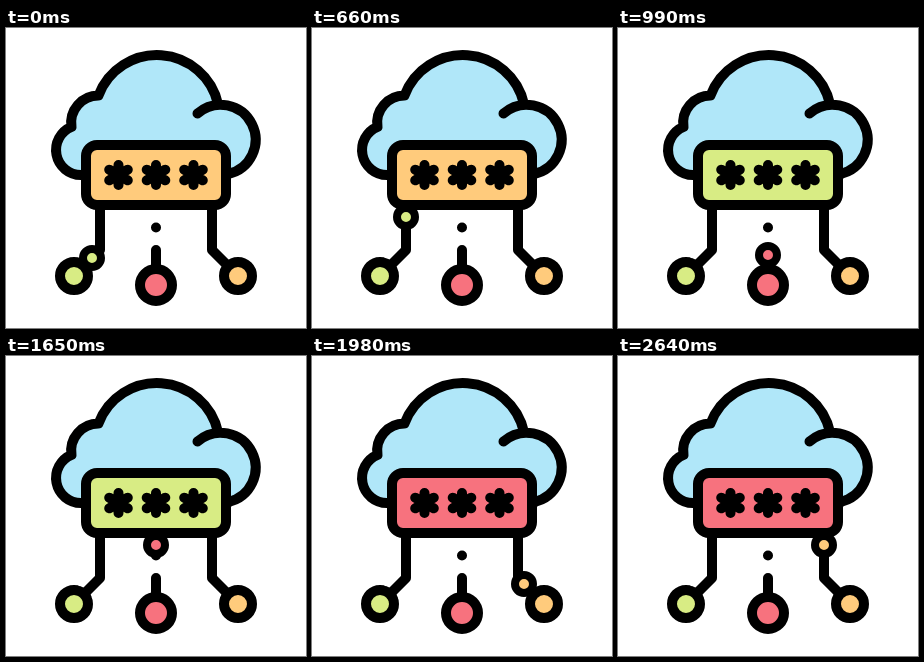
These frames come from a looping animation (300 by 300 pixels, 2970 ms). An HTML page:

```html
<!DOCTYPE html>
<html lang="en">
<head>
<meta charset="utf-8">
<title>Cloud password</title>
<style>
  html, body { margin: 0; height: 100%; overflow: hidden; background: #fff; }
  svg { display: block; width: 100%; height: 100%; }
</style>
</head>
<body>
<svg viewBox="0 0 300 300" fill="none" stroke="#000" stroke-width="10" stroke-linecap="round" stroke-linejoin="round">
  <defs>
    <path id="star" d="M0 -10V10M-9.3 -5.3L9.3 5.3M-9.3 5.3L9.3 -5.3"/>
  </defs>
  <path fill="#b0e7f9" stroke="none" d="M75 147A25 25 0 0 1 65.5 98.900A27.300 27.300 0 0 1 92.500 67.500A62.500 62.500 0 0 1 212 76A35 35 0 0 1 222 146Z"/>
  <path d="M75 147A25 25 0 0 1 65.5 98.900A27.300 27.300 0 0 1 92.500 67.500A62.500 62.500 0 0 1 212 76M191.500 85.500A35 35 0 1 1 222 146"/>
  <path d="M94 180V222L68 248M206 180V222L232 248M150 199.500h.01M150 222V240"/>
  <circle cx="68" cy="248" r="14" fill="#d8ec84"/>
  <circle cx="150" cy="257" r="16" fill="#f7727e"/>
  <circle cx="232" cy="248" r="14" fill="#ffcb7c"/>
  <circle id="ball" r="9" stroke-width="8"/>
  <rect id="box" x="80" y="117" width="140" height="60" rx="11"/>
  <use href="#star" x="112.500" y="147"/>
  <use href="#star" x="150" y="147"/>
  <use href="#star" x="187.500" y="147"/>
</svg>
<script>
  const STEP = 330;
  const ball = document.getElementById('ball');
  const box = document.getElementById('box');
  const green = '#d8ec84', pink = '#f7727e', orange = '#ffcb7c';

  // Each ball climbs its wire in three hard steps; the box keeps the last ball's colour.
  const runs = [
    { color: green, box: orange, path: [[86, 230], [94, 210], [94, 189]] },
    { color: pink, box: green, path: [[150, 227], [150, 208], [150, 189]] },
    { color: orange, box: pink, path: [[212, 228], [206, 210], [206, 189]] }
  ];

  function draw(now) {
    const step = Math.floor(now / STEP) % 9;
    const run = runs[Math.floor(step / 3)];
    const [x, y] = run.path[step % 3];
    ball.setAttribute('cx', x);
    ball.setAttribute('cy', y);
    ball.setAttribute('fill', run.color);
    box.setAttribute('fill', run.box);
  }

  let start;
  function tick(now) {
    start ??= now;
    draw(now - start);
    requestAnimationFrame(tick);
  }
  draw(0);
  requestAnimationFrame(tick);
</script>
</body>
</html>
```
